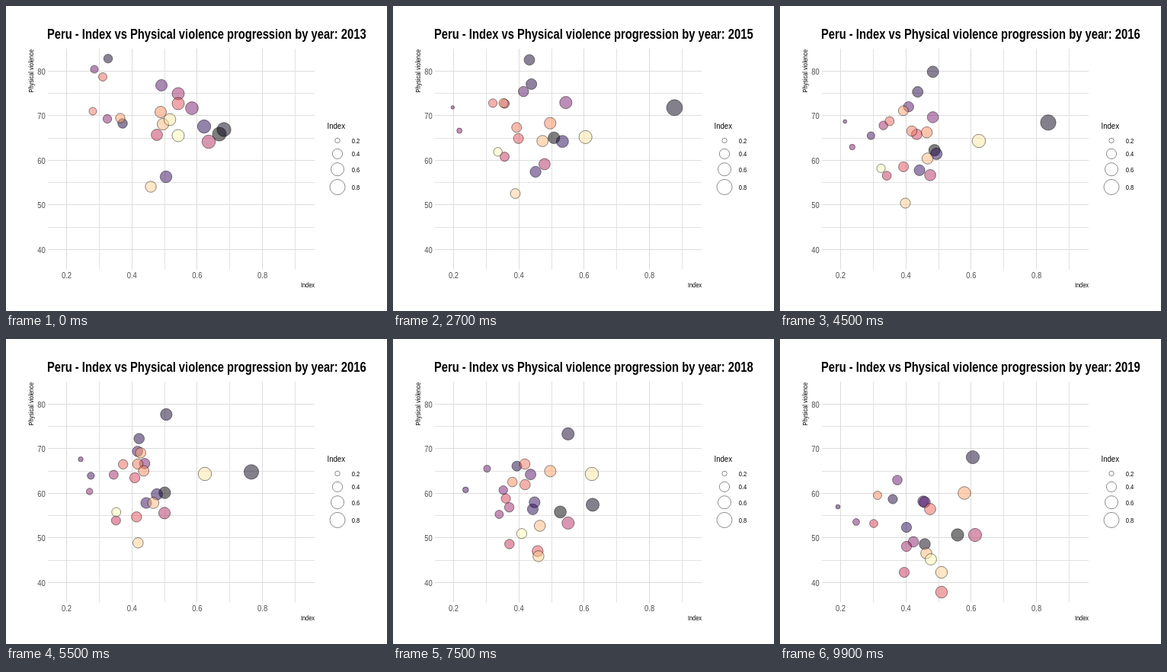
Animation, 500 px wide and 400 px high, one loop 10 s. Source, as an HTML page:

```html
<!DOCTYPE html>
<html lang="en">
<head>
<meta charset="utf-8">
<style>
  html, body { margin: 0; width: 100%; height: 100%; overflow: hidden; background: #fff; }
  svg { display: block; font-family: "Liberation Sans", Arial, sans-serif; }
  circle { stroke: #000; stroke-opacity: .5; stroke-width: .9; fill-opacity: .5; }
</style>
</head>
<body>
<svg id="chart" width="500" height="400" viewBox="0 0 500 400"></svg>
<script>
const chart = document.getElementById('chart');
const STEP = 100, LAST = 99, MID = LAST / 3;

// Key points of each region, in colour order: x, y in 2013, 2015 and 2019.
const regions = [
  [280, 168, 196, 174, 233, 257],
  [286, 162, 388, 127, 190, 269],
  [134, 69, 189, 71, 253, 155],
  [153, 154, 188, 91, 148, 210],
  [260, 158, 214, 182, 166, 247],
  [210, 224, 182, 216, 188, 213],
  [, , 129, 159, 76, 220],
  [204, 104, 164, 114, 190, 214],
  [116, 83, 70, 144, 154, 185],
  [244, 134, 223, 125, 100, 240],
  [133, 148, 77, 167, 175, 266],
  [226, 115, 129, 131, 166, 272],
  [266, 178, 184, 214, 256, 257],
  [198, 169, 135, 204, 163, 306],
  [, , 192, 152, 123, 242],
  [226, 128, 151, 184, 212, 332],
  [127, 93, 132, 135, 197, 223],
  [114, 138, 173, 164],
  [203, 139, 207, 157, 128, 205],
  [150, 147, 144, 123, 242, 202],
  [206, 155, 194, 182, 192, 281],
  [190, 237, 154, 248, 212, 306],
  [215, 149, 261, 177],
  [226, 170, 118, 196, 198, 289]
];

// Evenly spaced stops of the colour scale.
const stops = ['000004', '2c095f', '7c1c71', 'd83957', 'fe915c', 'fcfdb4']
  .map(hex => [0, 2, 4].map(i => parseInt(hex.slice(i, i + 2), 16)));

const mix = (a, b, k) => a + (b - a) * k;
const mixAll = (a, b, k) => a.map((v, i) => mix(v, b[i], k));
const xOf = index => 79.5 + (index - 0.2) * 428.5;
const yOf = percent => 319.4 - (percent - 40) * 5.85;
const snap = v => Math.floor(v) + 0.5;

// Bubble radius follows the square root of the index, so it depends on x.
const radius = x => 1.6 + 9.2 * Math.sqrt(Math.max(0, x - 70) / 318);

function colour(k) {
  const pos = k * (stops.length - 1), i = Math.min(Math.floor(pos), stops.length - 2);
  return `rgb(${mixAll(stops[i], stops[i + 1], pos - i).map(Math.round)})`;
}

function add(tag, attrs) {
  const el = document.createElementNS('http://www.w3.org/2000/svg', tag);
  for (const name in attrs) el.setAttribute(name, attrs[name]);
  return chart.appendChild(el);
}

// All lettering uses the same narrow face, 82% of the regular one.
function label(text, x, y, size, attrs = {}, turn = 0) {
  const el = add('text', {
    transform: `translate(${x} ${y}) rotate(${turn}) scale(.82 1)`, 'font-size': size, ...attrs
  });
  el.textContent = text;
  return el;
}

function line(x1, y1, x2, y2, major) {
  add('line', { x1, y1, x2, y2, stroke: major ? '#dcdcdc' : '#e2e2e2' });
}

const end = { 'text-anchor': 'end' };
const tickStyle = { fill: '#4d4d4d' };

for (let p = 40; p <= 80; p += 5) {
  const y = snap(yOf(p)), major = p % 10 === 0;
  line(55, y, 405, y, major);
  if (major) label(p, 51.7, yOf(p) + 4.2, 11.5, { ...end, ...tickStyle });
}
for (let n = 2; n <= 9; n++) {
  const x = xOf(n / 10), major = n % 2 === 0;
  line(snap(x), 56, snap(x), 345.5, major);
  if (major) label((n / 10).toFixed(1), x, 357, 11.5, { 'text-anchor': 'middle', ...tickStyle });
}

const title = label('', 54, 43, 18, { 'font-weight': 'bold' });
label('Index', 405, 369, 9, end);
label('Physical violence', 36, 57, 9, end, -90);
label('Index', 421.5, 161, 11.7);

// Legend rows move apart as the circles grow.
for (let i = 0; i < 4; i++) {
  const value = 0.2 * (i + 1), cy = 176.4 + 16 * i + 1.45 * i * i;
  add('circle', { cx: 435, cy, r: radius(xOf(value)), fill: 'none' });
  label(value.toFixed(1), 453.7, cy + 3.3, 9.2);
}

const bubbles = regions.map((_, i) => add('circle', { fill: colour(i / (regions.length - 1)) }));

// x, y and radius in one of the three years, or null without data.
function stateOf([...row], year) {
  const [x, y] = row.slice(2 * year);
  return x === undefined ? null : [x, y, radius(x)];
}

// Regions without a start appear on arrival; those without an end wait until the last step.
function place(row, frame) {
  const late = frame >= MID;
  const from = stateOf(row, late ? 1 : 0), to = stateOf(row, late ? 2 : 1);
  const k = late ? (frame - MID) / (LAST - MID) : frame / MID;
  if (from && to) return mixAll(from, to, k);
  return k < 1 ? from : to;
}

function draw(now) {
  const frame = Math.floor(now / STEP) % (LAST + 1);
  const year = 2013 + Math.round(6 * frame / LAST);
  title.textContent = `Peru - Index vs Physical violence progression by year: ${year}`;
  bubbles.forEach((bubble, i) => {
    const spot = place(regions[i], frame);
    bubble.style.display = spot ? '' : 'none';
    if (spot) ['cx', 'cy', 'r'].forEach((name, n) => bubble.setAttribute(name, spot[n]));
  });
}

function tick() {
  draw(performance.now());
  requestAnimationFrame(tick);
}
tick();
</script>
</body>
</html>
```
